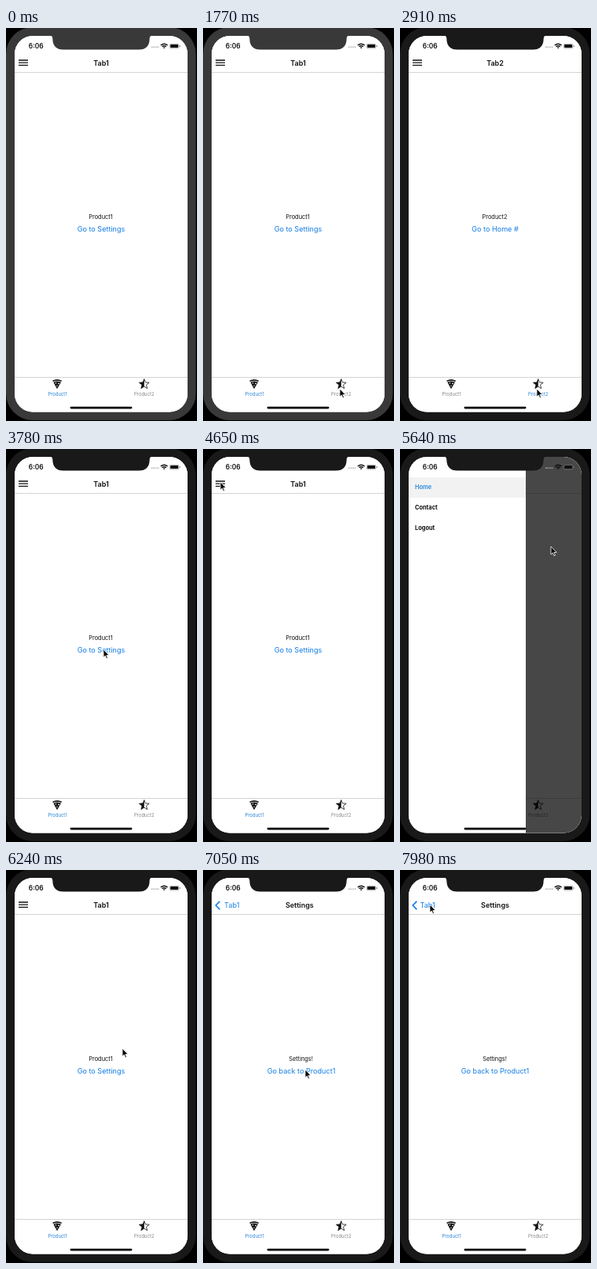
Write an HTML page that moves like this. It is 243 px wide and 500 px high and loops after 8000 ms.

```html
<!DOCTYPE html>
<html lang="en">
<head>
<meta charset="utf-8">
<title>Tabs, drawer and stack navigation</title>
<style>
  html, body { margin: 0; width: 100%; height: 100%; overflow: hidden; background: #000; }
  svg { display: block; width: 100%; height: 100%; }
  text { font: 400 7.4px Inter, Roboto, sans-serif; fill: #111; }
  .mid { text-anchor: middle; }
  .title { font-size: 9px; font-weight: 600; }
  .link { font-size: 9.1px; fill: #137de6; }
  .tab { font-size: 5.9px; }
  .item { font-weight: 700; }
  .clock { font-size: 8.4px; font-weight: 600; }
</style>
</head>
<body>
<svg viewBox="0 0 243 500">
  <defs>
    <clipPath id="screenClip"><rect x="11" y="10" width="220" height="478.5" rx="23"/></clipPath>
  </defs>
  <rect id="bezel" x="0" y="-1" width="241.5" height="500" rx="34"/>

  <g clip-path="url(#screenClip)">
    <rect x="11" y="10" width="220" height="479" fill="#fff"/>

    <g id="home">
      <rect x="11" y="57" width="220" height="387" fill="#fff"/>
      <text id="label" class="mid" x="120.5" y="243"></text>
      <text id="homeLink" class="link mid" x="121" y="259"></text>
    </g>
    <g id="settings">
      <rect x="11" y="57" width="220" height="387" fill="#fff"/>
      <text class="mid" x="120.5" y="243">Settings!</text>
      <text class="link mid" x="121" y="259">Go back to Product1</text>
    </g>

    <rect x="11" y="10" width="220" height="46" fill="#fff"/>
    <path d="M11 56.5H231M11 444.5H231" stroke="#c9c9c9" stroke-width=".8"/>
    <path id="menu" d="M16 41H28M16 44.2H28M16 47.4H28" stroke="#111" stroke-width="1.3"/>
    <text id="homeTitle" class="title mid" x="121" y="48"></text>
    <text id="settingsTitle" class="title mid" x="121" y="48">Settings</text>
    <g id="back">
      <path d="M21.3 39.8L16.3 45L21.3 50.2" fill="none" stroke="#137de6" stroke-width="1.7"/>
      <text id="backLabel" class="link" x="25.5" y="48">Tab1</text>
    </g>

    <rect x="11" y="445" width="220" height="44" fill="#fff"/>
    <g>
      <path d="M59.2 448.6Q65 445.2 71 448.6L70.3 450Q65 447.3 59.9 450Z" fill="#111"/>
      <path d="M60.4 450.7Q65 448.2 69.9 450.7L65 459.3Z" fill="#111"/>
      <g fill="#fff">
        <circle cx="63.4" cy="451.8" r=".8"/>
        <circle cx="67.1" cy="452.3" r=".9"/>
        <circle cx="65" cy="455.3" r=".7"/>
      </g>
    </g>
    <path id="star" fill="none" stroke="#111" stroke-width=".8"/>
    <path id="halfStar" fill="#111"/>
    <text id="tab1" class="tab mid" x="65.5" y="468">Product1</text>
    <text id="tab2" class="tab mid" x="175.8" y="468">Product2</text>

    <rect id="shade" x="11" y="10" width="220" height="479"/>
    <g id="drawer">
      <rect x="11" y="10" width="149" height="479" fill="#fff"/>
      <rect x="11" y="36" width="149" height="26" fill="#f2f2f2"/>
      <text class="item" x="19" y="51.3" style="fill:#3b94dd">Home</text>
      <text class="item" x="19" y="77.3">Contact</text>
      <text class="item" x="19" y="103.3">Logout</text>
    </g>

    <text class="clock" x="28.8" y="26">6:06</text>
    <path d="M185 24.3H195" stroke="#aaa" stroke-width="1.5" stroke-dasharray="1.5 1.1"/>
    <g fill="none" stroke="#111">
      <path d="M196.8 22Q201.2 18.3 205.6 22M198.5 23.8Q201.2 21.6 203.9 23.8" stroke-width="1.4"/>
      <path d="M199.8 24.7L201.2 26.2L202.6 24.7Q201.2 23.7 199.8 24.7Z" fill="#111" stroke="none"/>
      <rect x="208.3" y="20.3" width="11.6" height="5.6" rx="1.5" stroke="#777" stroke-width=".6"/>
      <rect x="209.1" y="21.1" width="10" height="4" rx=".8" fill="#111" stroke="none"/>
      <path d="M221.2 22.1V24.1" stroke="#777" stroke-width=".9"/>
    </g>
    <rect x="81.5" y="481.7" width="79" height="2.8" rx="1.4" fill="#050505"/>
  </g>

  <path id="notch" d="M55 9Q59.3 9.5 59.3 13.5Q59.5 27.5 73 27.5H169Q182.5 27.5 182.7 13.5Q182.7 9.5 187 9Z"/>
  <path id="cursor" d="M0 0V10.2L2.3 8.1L3.9 11.8L5.5 11.1L3.9 7.5H7.2Z"
        fill="#080808" stroke="#fff" stroke-width=".8" stroke-linejoin="round"/>
</svg>

<script>
  const LOOP = 8000;
  const $ = id => document.getElementById(id);
  const clamp = x => Math.min(1, Math.max(0, x));
  const progress = (t, start, end) => clamp((t - start) / (end - start));
  const inOut = x => x * x * (3 - 2 * x);
  const out = x => 1 - (1 - x) ** 3;
  const mix = (a, b, p) => a + (b - a) * p;
  const shift = (id, x, y = 0) => $(id).setAttribute('transform', `translate(${x} ${y})`);
  const fade = (id, value) => $(id).setAttribute('opacity', value);

  // Cursor stops: arrival time, departure time, x, y
  const stops = [
    [0, 850, 246, 400],
    [1500, 3000, 174, 459],
    [3500, 3850, 124, 255],
    [4450, 4950, 22, 42],
    [5450, 5850, 192, 124],
    [6230, 6270, 148, 227],
    [6500, 7150, 130, 254],
    [7700, 8000, 38, 44],
  ];

  const FOCUS = 2050, TO_TAB2 = 2300, TO_TAB1 = 3720;
  const OPEN = 4780, CLOSE = 5760, PUSH = 6720;

  const starPoint = i => {
    const radius = i % 2 ? 2.9 : 6.7, angle = i * Math.PI / 5;
    return [175.8 + radius * Math.sin(angle), 453.2 - radius * Math.cos(angle)];
  };
  const polygon = points => 'M' + points.map(p => p.join(' ')).join('L') + 'Z';
  $('star').setAttribute('d', polygon([...Array(10).keys()].map(starPoint)));
  $('halfStar').setAttribute('d', polygon([5, 6, 7, 8, 9, 10].map(starPoint)));

  function cursorAt(t) {
    const next = stops.findIndex(s => s[0] > t);
    const to = stops[next < 0 ? stops.length - 1 : next];
    const from = next < 0 ? to : stops[next - 1];
    const p = inOut(progress(t, from[1], to[0]));
    return [mix(from[2], to[2], p), mix(from[3], to[3], p)];
  }

  function draw(t) {
    const bezel = t < FOCUS ? '#393939' : '#191919';
    $('bezel').style.fill = $('notch').style.fill = bezel;

    const tab = t >= TO_TAB2 && t < TO_TAB1 ? 2 : 1;
    $('homeTitle').textContent = 'Tab' + tab;
    $('label').textContent = 'Product' + tab;
    $('homeLink').textContent = tab === 1 ? 'Go to Settings' : 'Go to Home #';
    for (const n of [1, 2]) $('tab' + n).style.fill = n === tab ? '#2583d8' : '#858585';

    const push = out(progress(t, PUSH, PUSH + 450));
    shift('home', -66 * push);
    shift('settings', 220 * (1 - push));
    shift('homeTitle', -86 * push);
    shift('settingsTitle', 100 * (1 - push));
    shift('backLabel', 86 * (1 - push));
    fade('homeTitle', clamp(1 - 2 * push));
    fade('menu', clamp(1 - 2 * push));
    fade('settingsTitle', push);
    fade('back', clamp(2 * push - 1));

    const drawer = out(progress(t, OPEN, OPEN + 350)) - out(progress(t, CLOSE, CLOSE + 300));
    shift('drawer', -150 * (1 - drawer));
    fade('shade', .72 * drawer);

    shift('cursor', ...cursorAt(t));
  }

  const start = performance.now();
  function tick() {
    draw((performance.now() - start) % LOOP);
    requestAnimationFrame(tick);
  }
  tick();
</script>
</body>
</html>
```
